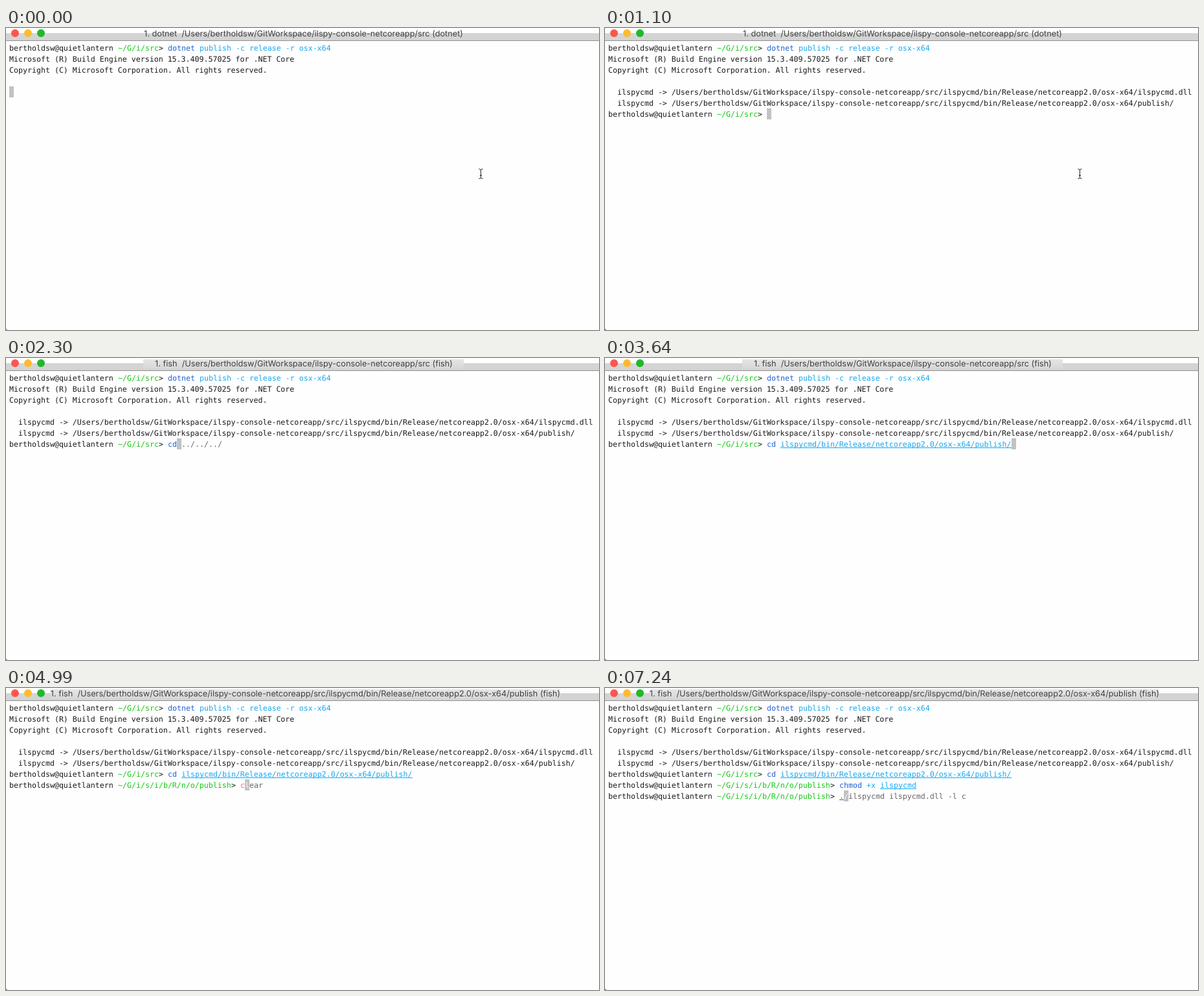
These frames come from a looping animation (916 by 466 pixels, 8 s). An HTML page with a canvas:

```html
<!DOCTYPE html>
<html lang="en">
<head>
<meta charset="utf-8">
<title>Terminal</title>
<style>
  html, body { margin: 0; width: 100%; height: 100%; overflow: hidden; background: #fefefe; }
  canvas { display: block; }
</style>
</head>
<body>
<canvas id="stage" width="916" height="466"></canvas>
<script>
const ctx = document.getElementById('stage').getContext('2d');
const LOOP = 8000, LEFT = 5, TOP = 22, CELL = 7, ROW = 17;
const INK = '#1a1a1a', GREEN = '#14c814', BLUE = '#1f63d6', SKY = '#16a9f2',
      RED = '#f26d6d', GREY = '#666', CURSOR = '#c2c2c2', PAPER = '#fefefe';
const MONO = '11.627px "DejaVu Sans Mono", monospace';
const SANS = '12.72px Inter, sans-serif';

const user = 'bertholdsw', host = 'quietlantern';
const src = `/Users/${user}/GitWorkspace/ilspy-console-netcoreapp/src`;
const buildPath = 'ilspycmd/bin/Release/netcoreapp2.0/osx-x64/';

// Text runs are [text, colour, underlined].
const plain = text => [[text, INK]];
const prompt = path => [[`${user}@${host} `, INK], [path, GREEN], ['> ', INK]];
const srcPrompt = prompt('~/G/i/src');
const publishPrompt = prompt('~/G/i/s/i/b/R/n/o/publish');

const output = [
  [0, [...srcPrompt, ['dotnet ', BLUE], ['publish -c release -r osx-x64', SKY]]],
  [0, plain('Microsoft (R) Build Engine version 15.3.409.57025 for .NET Core')],
  [0, plain('Copyright (C) Microsoft Corporation. All rights reserved.')],
  [0, []],
  [500, plain(`  ilspycmd -> ${src}/${buildPath}ilspycmd.dll`)],
  [1100, plain(`  ilspycmd -> ${src}/${buildPath}publish/`)],
];

const cd = [['cd ', BLUE], [buildPath + 'publish/', SKY, true]];
const chmod = [['chmod ', BLUE], ['+x ', SKY], ['ilspycmd', SKY, true]];

// Each input line: its row, prompt and [time, runs, cursor column] steps.
const inputs = [
  { row: 6, prompt: srcPrompt, steps: [
    [1100, [], 0],
    [2150, [['c', RED], ['lear', GREY]], 1],
    [2300, [['cd', BLUE], [' ../../../', GREY]], 2],
    [3050, [['cd ', BLUE], ['../../../', GREY]], 3],
    [3640, cd, 54],
    [4090, cd, -1],
  ] },
  { row: 7, prompt: publishPrompt, steps: [
    [4090, [], 0],
    [4990, [['c', RED], ['lear', GREY]], 1],
    [5140, [['ch', RED], ['mod +x ilspycmd', GREY]], 2],
    [5740, chmod, 17],
    [6190, chmod, -1],
  ] },
  { row: 8, prompt: publishPrompt, steps: [
    [6190, [], 0],
    [7240, [['.', BLUE, true], ['/ilspycmd ilspycmd.dll -l c', GREY]], 1],
  ] },
];

// [time, text, centre, shaded from, shaded to]
const titles = [
  [0, `1. dotnet  ${src} (dotnet)`, 459.5, 0, 0],
  [1250, `1. fish  ${src} (dotnet)`, 459.5, 212, 707],
  [2000, `1. fish  ${src} (fish)`, 460, 212, 707],
  [4090, `1. cd  ${src} (fish)`, 459.5, 690, 707],
  [4240, `1. fish  ${src}/${buildPath}publish (fish)`, 462.5, 69, 856],
];

// [time, x, y] of the pointer's centre
const pointerStops = [[0, 734, 225], [1550, 741, 233], [1700, 852, 383], [1850, -50, -50]];

const latest = (steps, t) => steps.filter(step => step[0] <= t).pop();
const textOf = runs => runs.map(run => run[0]).join('');

function rect(x, y, w, h, color) {
  ctx.fillStyle = color;
  ctx.fillRect(x, y, w, h);
}

function drawRuns(row, runs) {
  let x = LEFT;
  const y = TOP + row * ROW;
  for (const [text, color, underlined] of runs) {
    const width = text.length * CELL;
    ctx.fillStyle = color;
    ctx.fillText(text, x, y + 13);
    if (underlined) rect(x, y + 14, width, 1, color);
    x += width;
  }
}

function drawCursor(row, column, char = '') {
  const x = LEFT + column * CELL, y = TOP + row * ROW;
  rect(x, y, CELL, ROW, CURSOR);
  ctx.fillStyle = '#f8f8f8';
  ctx.fillText(char, x, y + 13);
}

function drawTitleBar(t) {
  const [, text, centre, from, to] = latest(titles, t);
  rect(0, 8, 916, 11, '#d4d4d4');
  rect(0, 19, 916, 1, '#909090');
  const shade = ctx.createLinearGradient(0, 2, 0, 16);
  shade.addColorStop(0, '#e5e5e5');
  shade.addColorStop(1, '#d8d8d8');
  rect(from, 2, to - from, 14, shade);

  ['#fc5650', '#fdbb30', '#1fb92b'].forEach((color, i) => {
    ctx.fillStyle = color;
    ctx.beginPath();
    ctx.arc(14 + 20 * i, 8, 6, 0, 7);
    ctx.fill();
  });

  ctx.font = SANS;
  ctx.textAlign = 'center';
  ctx.fillStyle = '#404040';
  ctx.fillText(text, centre, 13);
  ctx.textAlign = 'left';
}

function drawTerminal(t) {
  ctx.font = MONO;
  output.forEach(([start, runs], row) => { if (t >= start) drawRuns(row, runs); });
  if (t < 1100) drawCursor(t < 500 ? 4 : 5, 0);
  for (const input of inputs) {
    const step = latest(input.steps, t);
    if (!step) continue;
    const [, runs, column] = step;
    drawRuns(input.row, [...input.prompt, ...runs]);
    if (column >= 0) {
      drawCursor(input.row, textOf(input.prompt).length + column, textOf(runs)[column]);
    }
  }
}

function drawPointer(t) {
  const [, x, y] = latest(pointerStops, t);
  ctx.strokeStyle = '#222';
  ctx.lineWidth = 1;
  ctx.beginPath();
  ctx.moveTo(x - 0.5, y - 6);
  ctx.lineTo(x - 0.5, y + 6);
  for (const side of [-1, 1]) {
    for (const end of [-1, 1]) {
      ctx.moveTo(x - 0.5 + 3 * side, y + 7.5 * end);
      ctx.quadraticCurveTo(x - 0.5, y + 7.5 * end, x - 0.5, y + 5.5 * end);
    }
  }
  ctx.moveTo(x - 2, y + 2.5);
  ctx.lineTo(x + 1, y + 2.5);
  ctx.stroke();
}

function drawCorner() {
  ctx.fillStyle = '#333';
  ctx.beginPath();
  ctx.moveTo(0, 463);
  ctx.quadraticCurveTo(0, 466, 3, 466);
  ctx.lineTo(0, 466);
  ctx.fill();
}

function frame(now) {
  const t = now % LOOP;
  ctx.textRendering = 'geometricPrecision';
  rect(0, 0, 916, 466, PAPER);
  drawTitleBar(t);
  drawTerminal(t);
  drawPointer(t);
  drawCorner();
  requestAnimationFrame(frame);
}
requestAnimationFrame(frame);
</script>
</body>
</html>
```
